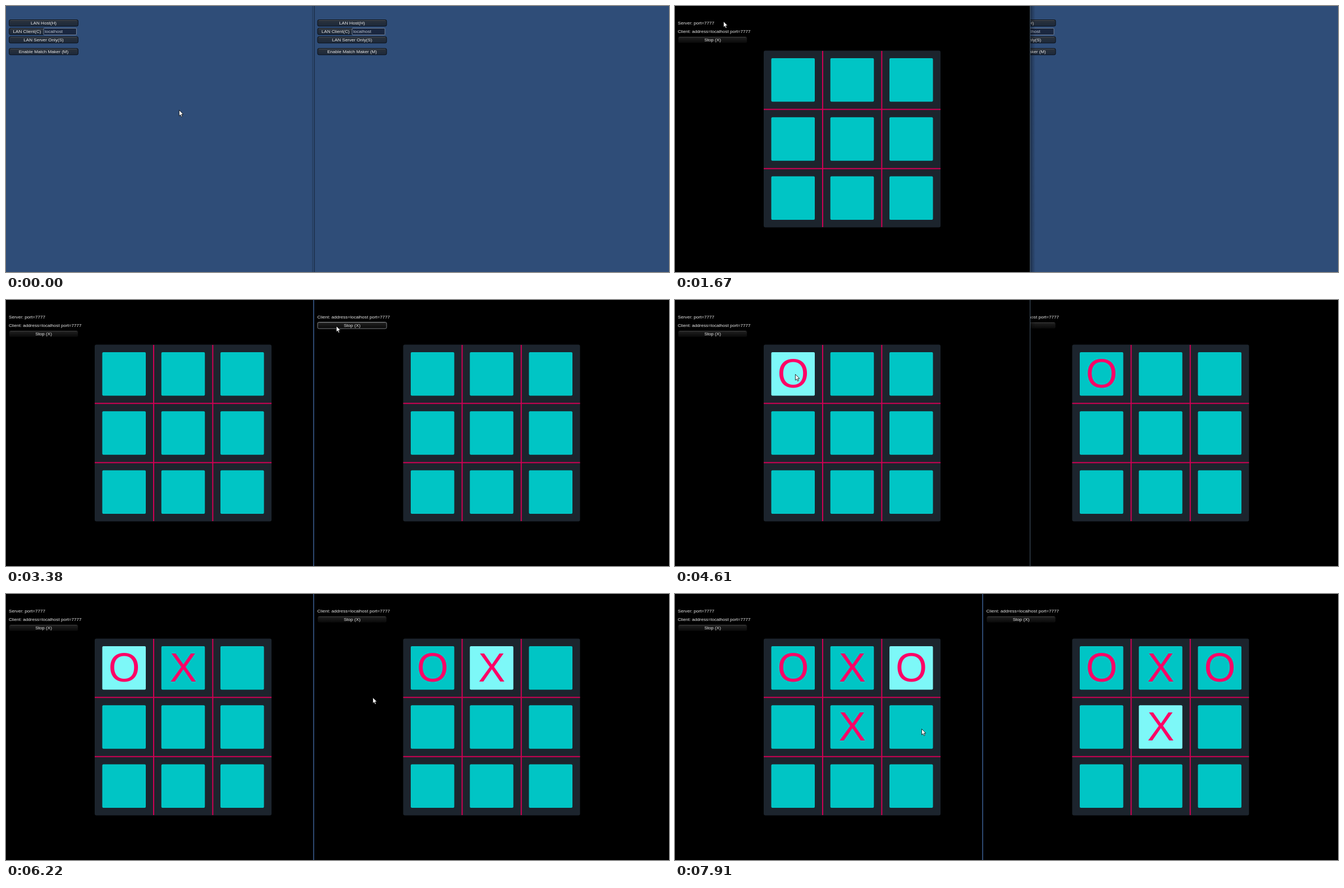
Write an HTML page that moves like this. It is 1181x474 px and loops after 7990 ms.

```html
<!DOCTYPE html>
<html lang="en">
<head>
<meta charset="utf-8">
<title>Networked tic-tac-toe</title>
<style>
  html, body { margin: 0; width: 100%; height: 100%; overflow: hidden; background: #000; }
  svg { display: block; width: 1181px; height: 474px; }
  text { font: 8.1px "Liberation Sans", Arial, sans-serif; fill: #e8e8e8; }
  .mid { text-anchor: middle; }
  .sky { fill: #2f4d78; }
  .btn { fill: url(#face); stroke: rgba(0, 0, 0, .72); }
  .hot .btn { stroke: rgba(190, 195, 200, .62); }
  .field { fill: #1a2740; stroke: #8592a6; stroke-width: .8; }
  .typed { fill: #bcc4d0; }
  .panel { fill: #1c242d; }
  .rule { stroke: #cf0053; stroke-width: 2; }
  .mark { font-size: 72px; fill: #ff0066; }
</style>
</head>
<body>
<svg id="stage" viewBox="0 0 1181 474"></svg>
<script>
const LOOP = 7990;
const STEP = 77;
const RIGHT_X = 549.5;
const CELL = { x: 171.5, y: 93, size: 77.5, pitch: 105.25 };
const COLORS = { normal: '#00c5c5', active: '#7df8f8', pressed: '#326565' };

const clicks = [
  { win: 0, cell: 0, down: 4516, up: 4593, mark: 'O' },
  { win: 1, cell: 1, down: 5440, up: 5594, mark: 'X' },
  { win: 0, cell: 2, down: 6595, up: 6672, mark: 'O' },
  { win: 1, cell: 4, down: 7442, up: 7519, mark: 'X' }
];
const focusChanges = [
  { win: 1, down: 0 }, { win: 0, down: 1436 }, { win: 1, down: 2360 }, ...clicks
];
const gameStart = [1590, 3207];
const hotSpans = { host0: [960, 1590], client1: [2900, 3207], stop1: [3207, 3560] };

// time, x, y; equal neighbours are pauses
const path = [
  [0, 308, 185], [280, 308, 185], [1060, 85, 26], [1280, 85, 26], [1290, 86, 27],
  [1690, 86, 27], [2210, 668, 50], [2437, 735, 52], [2590, 735, 52],
  [3050, 588, 46], [3550, 588, 46], [3910, 552, 66], [4440, 214, 132],
  [4660, 214, 132], [4770, 233, 133], [5430, 857, 134], [5820, 857, 134],
  [6200, 660, 184], [6450, 455, 160], [6570, 428, 139], [6720, 428, 139],
  [6980, 716, 190], [7270, 861, 238], [7540, 861, 238], [7904, 439, 240], [LOOP, 439, 240]
];

const cellX = i => CELL.x + (i % 3) * CELL.pitch;
const cellY = i => CELL.y + Math.floor(i / 3) * CELL.pitch;
const nine = [...Array(9).keys()];

const label = (x, y, s, cls = '') => `<text class="${cls}" x="${x}" y="${y}">${s}</text>`;

function button(id, y, s, w = 124) {
  return `<g id="${id}">
    <rect class="btn" x="5.5" y="${y + .5}" width="${w - 1}" height="11.5" rx="2.5"/>
    <path d="M8 ${y + 1.5}h${w - 6}" stroke="rgba(255,255,255,.13)"/>
    ${label(5 + w / 2, y + 9.3, s, 'mid')}</g>`;
}

const lobby = w => `<g id="lobby${w}">
  <rect class="sky" width="640" height="474"/>
  ${button('host' + w, 24, 'LAN Host(H)')}
  ${button('client' + w, 39, 'LAN Client(C)', 65)}
  <rect class="field" x="67" y="39.5" width="58.5" height="12" rx="1.5"/>
  ${label(69, 48.3, 'localhost', 'typed')}
  ${button('server' + w, 54, 'LAN Server Only(S)')}
  ${button('match' + w, 75, 'Enable Match Maker (M)')}</g>`;

function game(w) {
  const client = 'Client: address=localhost port=7777';
  const status = w
    ? label(5, 33.3, client) + button('stop1', 39, 'Stop (X)')
    : label(5, 33.3, 'Server: port=7777') + label(5, 48.3, client) + button('stop0', 54, 'Stop (X)');
  const cells = nine.map(i => `<rect id="cell${w}${i}" x="${cellX(i)}" y="${cellY(i)}"
    width="${CELL.size}" height="${CELL.size}" rx="2"/>`).join('');
  const marks = clicks.map((c, n) => `<text id="mark${w}${n}" class="mark mid"
    x="${cellX(c.cell) + 39}" y="${cellY(c.cell) + 63}">${c.mark}</text>`).join('');
  return `<g id="game${w}">
    <rect width="640" height="474"/>${status}
    <rect class="panel" x="158" y="79.5" width="315" height="315" rx="3"/>
    <path class="rule" d="M263 80v314M368.3 80v314M158 184.2h315M158 289.8h315"/>
    ${cells}${marks}</g>`;
}

const stage = document.getElementById('stage');
stage.innerHTML = `
  <defs>
    <linearGradient id="face" x2="0" y2="1">
      <stop stop-color="rgba(46,46,46,.78)"/>
      <stop offset="1" stop-color="rgba(16,16,16,.58)"/>
    </linearGradient>
    <linearGradient id="shade">
      <stop stop-color="rgba(0,0,0,.36)"/>
      <stop offset="1" stop-color="rgba(0,0,0,0)"/>
    </linearGradient>
    <clipPath id="leftClip"><rect id="leftEdge" width="547" height="474"/></clipPath>
  </defs>
  <g transform="translate(${RIGHT_X})">${lobby(1)}${game(1)}</g>
  <g clip-path="url(#leftClip)">${lobby(0)}${game(0)}</g>
  <g id="rightFront">
    <rect x="545" width="2" height="474" fill="rgba(0,0,0,.14)"/>
    <rect x="547" width="1" height="474" fill="#2a4366"/>
    <rect class="sky" x="548" width="1" height="474"/>
  </g>
  <g id="leftFront">
    <rect x="633" width="9" height="474" fill="url(#shade)"/>
    <rect x="632" width="1" height="474" fill="#435566"/>
  </g>
  <path id="cursor" d="M.4 .4V11L2.8 8.8L4.4 12.5L6.2 11.7L4.6 8H7.8Z"
    fill="#fff" stroke="#000" stroke-width=".8" stroke-linejoin="round"/>`;

const el = {};
stage.querySelectorAll('[id]').forEach(node => { el[node.id] = node; });
const show = (node, on) => node.setAttribute('display', on ? 'inline' : 'none');
const latest = (list, t) => list.filter(e => e.down <= t).pop();

function quantize(t) {
  if (t < 290) return 0;
  if (t < 1436) {
    const q = 290 + STEP * Math.floor((t - 290) / STEP);
    return t < 1290 ? Math.min(q, 1060) : 1290;
  }
  return 1436 + STEP * Math.floor((t - 1436) / STEP);
}

function slope(i, k) {
  const a = path[i - 1], b = path[i], c = path[i + 1];
  const still = (p, q) => p[1] === q[1] && p[2] === q[2];
  if (!a || !c || still(a, b) || still(b, c)) return 0;
  return (c[k] - a[k]) / (c[0] - a[0]);
}

function cursorAt(t) {
  const i = Math.max(0, path.findIndex(p => p[0] > t) - 1);
  const a = path[i], b = path[i + 1], d = b[0] - a[0], u = (t - a[0]) / d;
  const s = u * u * (3 - 2 * u);
  return [1, 2].map(k => a[k] + (b[k] - a[k]) * s
    + d * u * (1 - u) * ((1 - u) * slope(i, k) - u * slope(i + 1, k)));
}

function render(time) {
  const t = quantize(time);
  const [cx, cy] = cursorAt(t);
  const front = latest(focusChanges, t).win;

  el.leftEdge.setAttribute('width', front ? 547 : 633);
  show(el.rightFront, front);
  show(el.leftFront, !front);
  for (const id in hotSpans) {
    const [from, to] = hotSpans[id];
    el[id].classList.toggle('hot', t >= from && t < to);
  }

  for (const w of [0, 1]) {
    const playing = t >= gameStart[w];
    show(el['lobby' + w], !playing);
    show(el['game' + w], playing);
    const last = latest(clicks.filter(c => c.win === w), t);
    for (const i of nine) {
      const dx = cx - w * RIGHT_X - cellX(i), dy = cy - cellY(i);
      const over = front === w && dx > 0 && dy > 0 && dx < CELL.size && dy < CELL.size;
      const chosen = last && last.cell === i;
      const state = chosen && t < last.up ? 'pressed' : chosen || over ? 'active' : 'normal';
      el[`cell${w}${i}`].setAttribute('fill', COLORS[state]);
    }
    clicks.forEach((c, n) => show(el[`mark${w}${n}`], t >= c.up));
  }
  el.cursor.setAttribute('transform', `translate(${Math.round(cx)} ${Math.round(cy)})`);
}

const start = performance.now();
function tick() {
  render((performance.now() - start) % LOOP);
  requestAnimationFrame(tick);
}
tick();
</script>
</body>
</html>
```
